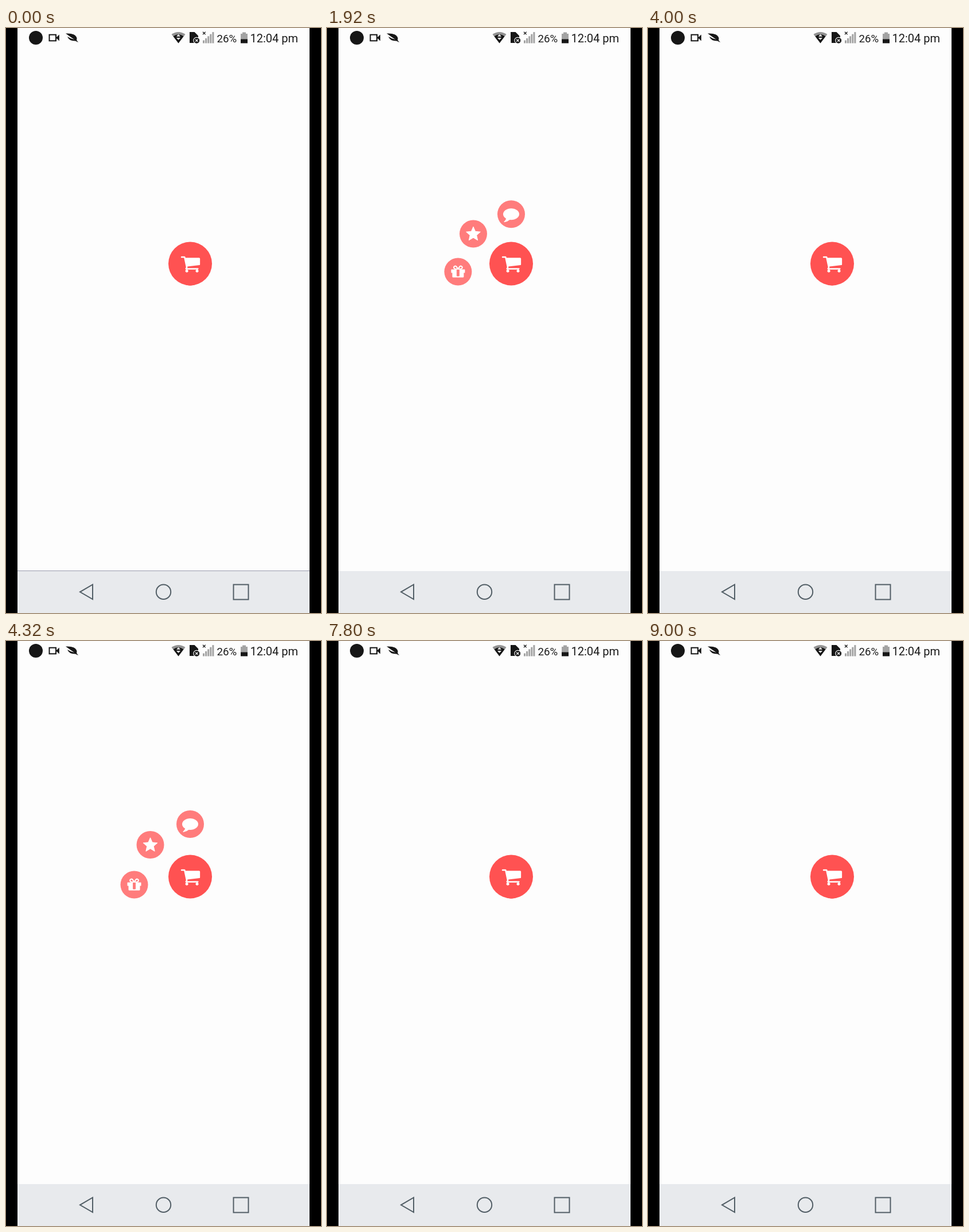
These frames come from a looping animation (549 px wide and 1019 px high, 9800 ms). An HTML page:

```html
<!DOCTYPE html>
<html lang="en">
<head>
<meta charset="utf-8">
<title>Floating action menu</title>
<style>
  html, body { margin: 0; width: 100%; height: 100%; overflow: hidden; background: #000; }
  svg { display: block; width: 100%; height: 100%; }
  text { font-family: Roboto, sans-serif; fill: #1a1a1a; }
</style>
</head>
<body>
<svg viewBox="0 0 549 1019">
  <rect width="549" height="1019" fill="#000"/>
  <rect x="20" width="509" height="946" fill="#fdfdfd"/>

  <!-- status bar -->
  <g fill="#161616">
    <circle cx="52" cy="17" r="12"/>
    <rect x="75.5" y="11.7" width="11.5" height="10.6" fill="none" stroke="#161616" stroke-width="2"/>
    <path d="M87 17L92.8 11.5V22.5Z"/>
    <path d="M104 9.5Q120 8.500 123 16Q124 19 123 21L126 25L121 22.500Q110 23 107 15Q112 18.500 119 20Q113 16 104 9.500Z"/>
    <path d="M288.500 11Q300.500 3 312.500 11L300.500 26.500Z" fill="#929292"/>
    <path d="M291.500 14.500Q300.500 8 309.500 14.500L300.500 26.500Z"/>
    <path d="M297 14.700L300.500 11L304 14.700ZM297 17L304 17L300.500 20.700Z" fill="#fff"/>
    <path d="M320 7H328.500L335 13.500V26H320Z"/>
    <circle cx="332.300" cy="21.800" r="5.500" stroke="#fdfdfd" stroke-width="1.200"/>
    <path d="M330.200 19.700l4.200 4.200m0-4.200l-4.200 4.200" stroke="#fff" stroke-width="1.300"/>
    <path d="M343 6.800l4.600 4.600m0-4.600l-4.600 4.600" stroke="#161616" stroke-width="1.300"/>
    <g id="bars" fill="#a3a3a3"></g>
    <path d="M409 10H412V7.500H418V10H421V20H409Z" fill="#a3a3a3"/>
    <rect x="409" y="19.500" width="12" height="7"/>
  </g>
  <text x="367.500" y="24.500" font-size="18.600">26%</text>
  <text x="425.500" y="24.700" font-size="20">12:04 pm</text>

  <!-- menu -->
  <g fill="#fff">
    <g class="item">
      <circle r="24" fill="#ff7c7c"/>
      <path fill-rule="evenodd" d="M-11.500-4H11.500Q12-4 12-3.500V1.500Q12 2 11.500 2H10V8.500Q10 10 8.500 10H-8.500Q-10 10-10 8.500V2H-11.500Q-12 2-12 1.500V-3.500Q-12-4-11.500-4ZM-2.500-4V7.200Q-2.500 8-1.500 8H1.500Q2.500 8 2.500 7.200V-4Z"/>
      <path d="M0-4.800L-2.700-8.600A2.500 2.500 0 1 0-4.600-4.800ZM0-4.800L2.700-8.600A2.500 2.500 0 1 1 4.600-4.800Z" fill="none" stroke="#fff" stroke-width="2"/>
    </g>
    <g class="item">
      <circle r="24" fill="#ff7c7c"/>
      <path id="star" stroke="#fff" stroke-width="1" stroke-linejoin="round"/>
    </g>
    <g class="item">
      <circle r="24" fill="#ff7c7c"/>
      <ellipse rx="14" ry="10"/>
      <path d="M-8.500 7Q-9.500 10.500-12.500 13Q-12.900 14-12 14Q-6 13-2 9.500Z"/>
    </g>
    <g transform="translate(321 410.500)">
      <circle r="38" fill="#ff5252"/>
      <path transform="translate(.5) scale(.02) translate(-896 -896)" d="M704 1536q0 52-38 90t-90 38-90-38-38-90 38-90 90-38 90 38 38 90zm896 0q0 52-38 90t-90 38-90-38-38-90 38-90 90-38 90 38 38 90zm128-1088v512q0 24-16.500 42.500t-40.500 21.500l-1044 122q13 60 13 70 0 16-24 64h920q26 0 45 19t19 45-19 45-45 19h-1024q-26 0-45-19t-19-45q0-20 61-137l-177-823h-204q-26 0-45-19t-19-45 19-45 45-19h256q32 0 48 22 14 20 26 106h1201q26 0 45 19t19 45z"/>
    </g>
  </g>

  <!-- navigation bar -->
  <rect x="20" y="946" width="509" height="73" fill="#e8eaed"/>
  <rect id="edge" x="20" y="945" width="509" height="1" fill="#9a9cae"/>
  <g fill="none" stroke="#525e66" stroke-width="2">
    <path d="M151 969.500V995L129 982.300Z"/>
    <circle cx="274.500" cy="982.300" r="12.700"/>
    <rect x="396.500" y="969.500" width="26" height="26"/>
  </g>
</svg>
<script>
const LOOP = 9800, DURATION = 300;
const HOME = { x: 321, y: 424.5 };
const OFFSETS = [[-97.5, 0], [-69.5, -69.5], [0, -105.5]];
const OPEN_AT = [1660, 3992, 7940];
const CLOSE_AT = [2592, 6112, 8672];

const items = document.querySelectorAll('.item');
const edge = document.getElementById('edge');

document.getElementById('bars').innerHTML = [0, 1, 2, 3, 4].map(i => {
  const h = 5 + i * 3.6;
  return `<rect x="${343 + i * 4.1}" y="${26.5 - h}" width="3" height="${h}"/>`;
}).join('');

document.getElementById('star').setAttribute('d', 'M' + Array.from({ length: 10 }, (_, i) => {
  const r = i % 2 ? 6 : 13, a = i * Math.PI / 5;
  return `${(r * Math.sin(a)).toFixed(2)} ${(0.7 - r * Math.cos(a)).toFixed(2)}`;
}).join('L') + 'Z');

// cubic-bezier(.42, 0, 1, 1), solved by bisection
function easeIn(x) {
  let lo = 0, hi = 1;
  for (let i = 0; i < 24; i++) {
    const s = (lo + hi) / 2, q = 1 - s;
    if (1.26 * s * q * q + 3 * s * s * q + s * s * s < x) lo = s;
    else hi = s;
  }
  return lo * lo * (3 - 2 * lo);
}

function easeInOut(t) {
  if (t <= 0) return 0;
  if (t >= 1) return 1;
  return t < 0.5 ? easeIn(2 * t) / 2 : 1 - easeIn(2 - 2 * t) / 2;
}

function openness(t) {
  const sum = starts => starts.reduce((n, at) => n + easeInOut((t - at) / DURATION), 0);
  return sum(OPEN_AT) - sum(CLOSE_AT);
}

function render(t) {
  const p = openness(t);
  items.forEach((item, i) => {
    const [dx, dy] = OFFSETS[i];
    item.setAttribute('transform', `translate(${HOME.x + dx * p} ${HOME.y + dy * p})`);
  });
  edge.setAttribute('visibility', t < 1680 ? 'visible' : 'hidden');
}

const start = performance.now();
function tick() {
  render((performance.now() - start) % LOOP);
  requestAnimationFrame(tick);
}
tick();
</script>
</body>
</html>
```
